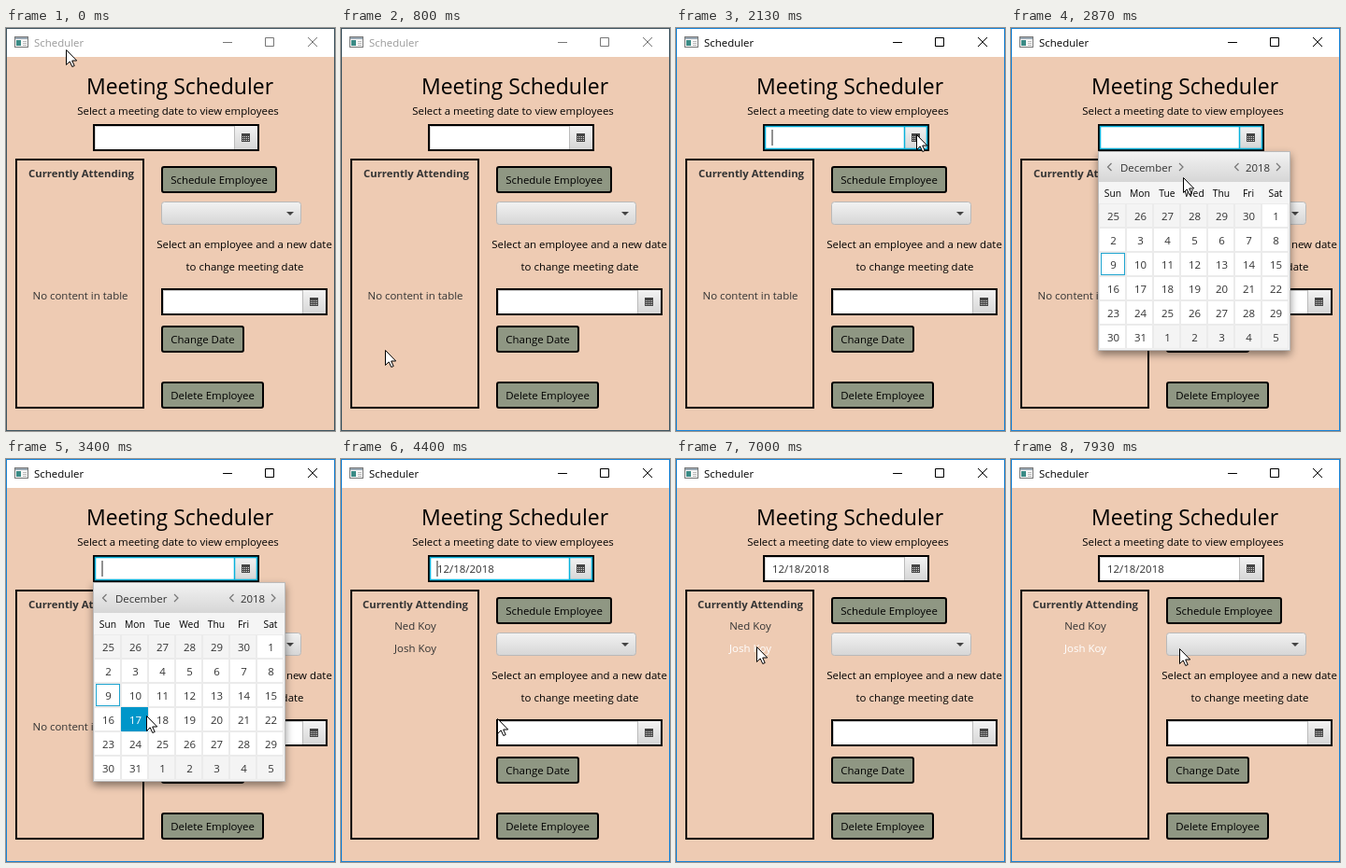
These frames come from a looping animation (352 by 432 pixels, 8000 ms). An HTML page:

```html
<!DOCTYPE html>
<html lang="en">
<head>
<meta charset="utf-8">
<title>Scheduler</title>
<style>
  html, body { margin: 0; width: 100%; height: 100%; overflow: hidden; background: #eecbb3; }
  svg { display: block; width: 352px; height: 432px; }
  text { font: 11.45px "Open Sans", "Noto Sans", sans-serif; fill: #000; white-space: pre; }
  .mid { text-anchor: middle; }
  .soft { fill: #333; }
  .heading { font-size: 23px; }
  .bold { font-size: 11.35px; font-weight: 700; }
  .weekday { font-size: 10.3px; }
  .button { fill: #8f9783; stroke: #000; stroke-width: 2; }
  .chevron { fill: none; stroke: #777; stroke-width: 1.2; }
  .focus { fill: none; stroke: #08b2dc; stroke-width: 1.5; }
  #controls { fill: none; stroke: #000; }
  #calendar { filter: drop-shadow(0 4px 4px rgba(0, 0, 0, .45)); }
  .cell rect { fill: #fff; stroke: #ebebeb; }
  .cell.other rect { fill: #f4f4f4; }
  .cell .today { fill: none; stroke: #20a5d0; }
  .cell.hover rect { fill: #0096c9; stroke: #0096c9; }
  .cell.hover text { fill: #fff; }
  .inactive #title { fill: #999; }
  .inactive #controls { stroke: #777; }
  .inactive #frame { stroke: #3f5560; }
  .picked { fill: #fff; }
</style>
</head>
<body>
<svg id="stage" viewBox="0 0 352 432">
  <defs>
    <linearGradient id="metal" x2="0" y2="1">
      <stop stop-color="#f2f2f2"/><stop offset="1" stop-color="#d6d6d6"/>
    </linearGradient>
    <g id="dateField">
      <rect x="1" y="1" width="176" height="27" fill="#fff" stroke="#000" stroke-width="2"/>
      <path d="M2.5 27V2.5H151" fill="none" stroke="#d0d0d0"/>
      <rect x="151" y="2" width="25" height="25" fill="url(#metal)"/>
      <path d="M151.5 2v25" stroke="#bbb"/>
      <rect x="159" y="10" width="9" height="9" fill="#444"/>
      <path d="M160 13.5h7M160 15.5h7M160 17.5h7" stroke="#ddd" stroke-dasharray="1 1"/>
    </g>
  </defs>

  <rect width="352" height="432" fill="#eecbb3"/>
  <rect width="352" height="31" fill="#fff"/>
  <rect x="9.5" y="9.5" width="14" height="11" fill="#f7f7f7" stroke="#777"/>
  <path d="M10 11h13" stroke="#9aa9b5" stroke-width="2"/>
  <rect x="11" y="13" width="5" height="6" fill="#3b8b86"/>
  <path d="M18 14.5h4M18 16.5h4M18 18.5h4" stroke="#bbb"/>
  <text id="title" x="30" y="20">Scheduler</text>
  <path id="controls" d="M232 15.5h10M277.500 10.500h9v9h-9zM323 10l10 10M333 10l-10 10"/>

  <text class="mid heading" x="186" y="71">Meeting Scheduler</text>
  <text class="mid" x="184" y="93">Select a meeting date to view employees</text>
  <use href="#dateField" x="93" y="103"/>
  <path id="focus" class="focus" d="M95.500 105.500h173v24h-173zM244.500 105v25"/>
  <text id="date" class="soft" x="103" y="121.500">12/18/2018</text>
  <path id="caret" d="M103 109v17" stroke="#555" stroke-width="1.300"/>

  <rect x="11" y="141" width="136" height="266" fill="none" stroke="#000" stroke-width="2"/>
  <text id="tableHead" class="mid soft bold" y="160">Currently Attending</text>
  <text id="empty" class="mid soft" x="79.500" y="291">No content in table</text>
  <g id="rows">
    <text class="mid soft" x="79.500" y="183">Ned Koy</text>
    <text id="second" class="mid soft" x="79.500" y="207">Josh Koy</text>
  </g>

  <rect class="button" x="167" y="149" width="122" height="27" rx="2"/>
  <text class="mid" x="228" y="167">Schedule Employee</text>
  <rect x="166.500" y="186.500" width="149" height="24" rx="3" fill="url(#metal)" stroke="#b9b9b9"/>
  <path d="M300 197h8l-4 4z" fill="#444"/>
  <text class="mid" x="255" y="236">Select an employee and a new date</text>
  <text class="mid" x="255.500" y="260">to change meeting date</text>
  <use href="#dateField" x="166" y="279"/>
  <rect class="button" x="167" y="320" width="87" height="27" rx="2"/>
  <text class="mid" x="210.500" y="338">Change Date</text>
  <rect class="button" x="167" y="380" width="108" height="27" rx="2"/>
  <text class="mid" x="221" y="398">Delete Employee</text>

  <g id="calendar">
    <rect x="93.500" y="132.500" width="205" height="213" fill="#f5f5f5" stroke="#bbb"/>
    <rect x="94" y="133" width="204" height="32" fill="url(#metal)"/>
    <path class="chevron" d="M107.500 145l-4 4 4 4M180 145l4 4-4 4M243.500 145l-4 4 4 4M284 145l4 4-4 4"/>
    <text class="soft" x="117" y="154">December</text>
    <text class="soft" x="251" y="154">2018</text>
  </g>

  <rect id="frame" x=".5" y=".5" width="351" height="431" fill="none" stroke="#1883d7"/>
  <path id="pointer" d="M.5.5v16l3.700-3.600 2.600 5.600 2.400-1-2.500-5.500h5z" fill="#fff" stroke="#000"/>
</svg>
<script>
const LOOP = 8000, STEP = 1000 / 15;
const CELL_W = 29, CELL_H = 26, GRID_X = 95, GRID_Y = 188;
const FOCUS = 2130, OPEN = 2400, CHOOSE = 4400, BLUR = 6470;

// Pointer path: time, x, y
const path = [
  [133, 64, 23], [267, 82, 62], [400, 86, 180], [533, 50, 325], [600, 38, 352],
  [733, 38, 352], [867, 55, 338], [1067, 115, 268], [1267, 190, 190], [1533, 247, 131],
  [1600, 254, 123], [1800, 257, 114],
  [2600, 257, 114], [2667, 246, 121], [2867, 184, 160], [3067, 162, 215], [3267, 151, 260],
  [3400, 150, 275], [3467, 152, 277], [3667, 167, 278],
  [5000, 167, 278], [5133, 155, 270], [5400, 106, 238], [5600, 89, 227], [5867, 84, 207], [6067, 83, 200],
  [6933, 83, 200], [7200, 96, 203], [7533, 122, 208], [7800, 148, 209], [7933, 180, 203]
];

const $ = id => document.getElementById(id);
const show = (id, on) => { $(id).style.display = on ? '' : 'none'; };

function add(parent, tag, attrs, content = '') {
  const node = document.createElementNS('http://www.w3.org/2000/svg', tag);
  for (const name in attrs) node.setAttribute(name, attrs[name]);
  node.textContent = content;
  return parent.appendChild(node);
}

['Sun', 'Mon', 'Tue', 'Wed', 'Thu', 'Fri', 'Sat'].forEach((name, i) =>
  add($('calendar'), 'text', { class: 'mid weekday', x: 109 + CELL_W * i, y: 181 }, name));

const cells = Array.from({ length: 42 }, (_, i) => {
  const day = new Date(2018, 10, 25 + i);
  const inMonth = day.getMonth() === 11;
  const x = GRID_X + CELL_W * (i % 7), y = GRID_Y + CELL_H * Math.floor(i / 7);
  const cell = add($('calendar'), 'g', { class: inMonth ? 'cell' : 'cell other' });
  add(cell, 'rect', { x: x - .5, y: y + .5, width: CELL_W - 1, height: CELL_H - 1 });
  if (inMonth && day.getDate() === 9) {
    add(cell, 'rect', { class: 'today', x: x + 1.5, y: y + 1.5, width: 25, height: 23 });
  }
  add(cell, 'text', { class: 'mid soft', x: x + 14.5, y: y + 17.5 }, day.getDate());
  return cell;
});

function pointerAt(t) {
  const next = path.findIndex(p => p[0] > t);
  if (next === 0) return path[0].slice(1);
  if (next < 0) return path[path.length - 1].slice(1);
  const [t0, x0, y0] = path[next - 1], [t1, x1, y1] = path[next];
  const f = (t - t0) / (t1 - t0);
  return [x0 + (x1 - x0) * f, y0 + (y1 - y0) * f].map(Math.round);
}

function draw(t) {
  const focused = t >= FOCUS && t < BLUR, chosen = t >= CHOOSE;
  const open = t >= OPEN && !chosen;
  const [x, y] = pointerAt(t);

  $('stage').classList.toggle('inactive', t < FOCUS);
  show('focus', focused);
  show('caret', focused && (t - FOCUS) % 1000 < 530);
  show('date', chosen);
  show('rows', chosen);
  show('empty', !chosen);
  show('calendar', open);
  $('tableHead').setAttribute('x', chosen ? 79.5 : 80.5);
  $('second').style.fill = t >= BLUR ? '#fff' : '';

  const col = Math.floor((x - GRID_X) / CELL_W), row = Math.floor((y - GRID_Y) / CELL_H);
  const hovered = open && row >= 0 ? row * 7 + col : -1;
  cells.forEach((cell, i) => cell.classList.toggle('hover', i === hovered));
  $('pointer').setAttribute('transform', `translate(${x} ${y})`);
}

function tick() {
  const t = performance.now() % LOOP;
  draw(Math.floor((t + 4) / STEP) * STEP % LOOP);
  requestAnimationFrame(tick);
}
tick();
</script>
</body>
</html>
```
